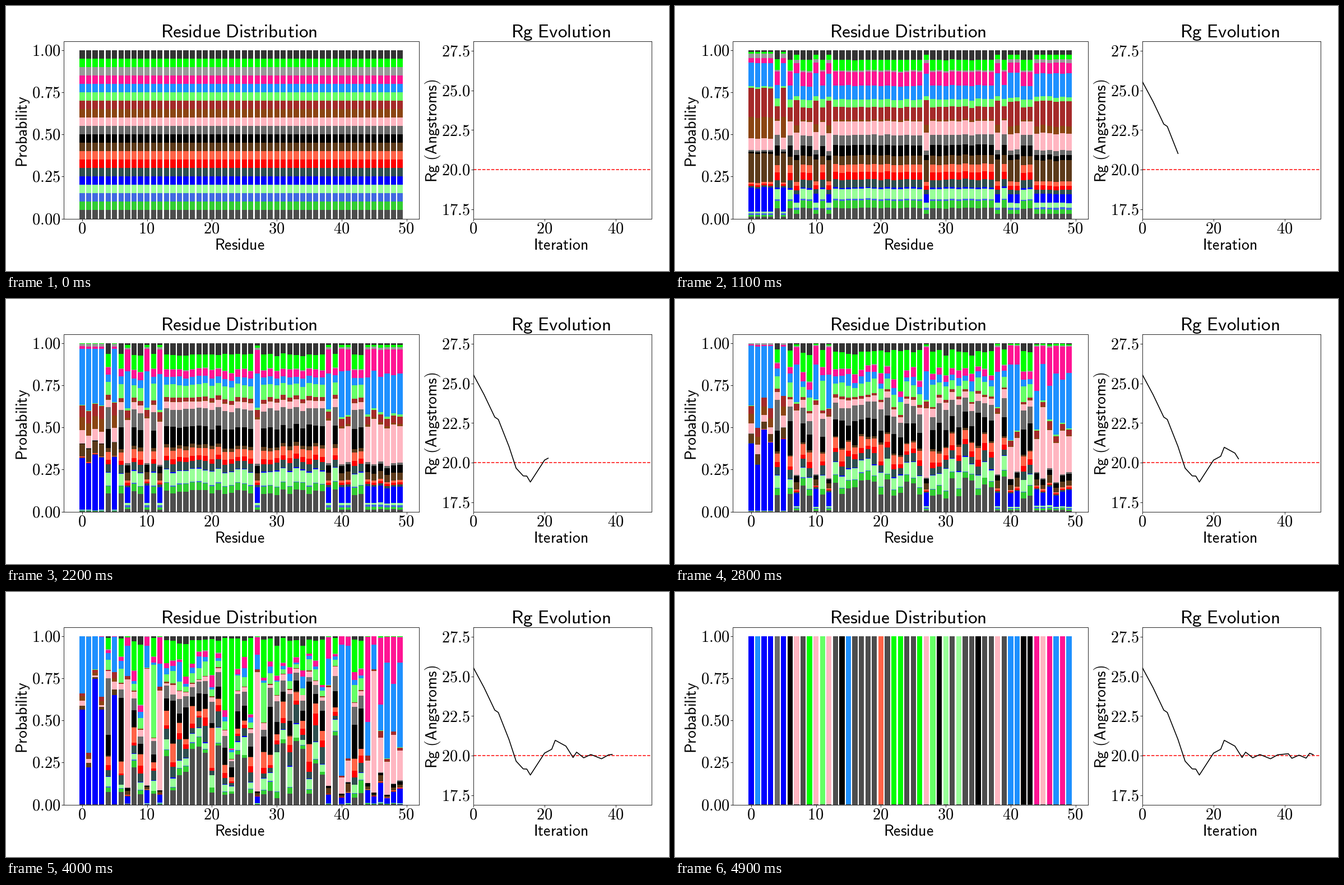
Animation of 1183x473 px, one loop 5 s. Source, as a matplotlib script:

```python
import numpy as np
import matplotlib.pyplot as plt
from matplotlib.animation import FuncAnimation
from matplotlib.collections import PolyCollection

W, H, DPI = 1183, 473, 100
FRAMES, BARS = 50, 50
plt.rcParams["mathtext.fontset"] = "cm"

COLORS = ["#4d4d4d", "#32cd32", "#4169e1", "#98ff98", "#0000ff",
          "#2f4f4f", "#ff0000", "#ff6347", "#5c3a1a", "#000000",
          "#696969", "#ffb6c1", "#8b4513", "#a52a2a", "#66ff66",
          "#1e90ff", "#ff1493", "#999999", "#00ff00", "#333333"]
KINDS = len(COLORS)
(GRAY, GREEN, ROYAL, PALE, BLUE, SLATE, RED, TOMATO, UMBER, BLACK,
 DIM, PINK, SADDLE, BROWN, MINT, DODGER, ROSE, SILVER, LIME, DARK) = range(KINDS)


def normal(p):
    return p / p.sum(axis=-1, keepdims=True)


def blend(a, b, u):
    """Softmax path between two compositions."""
    return normal(a ** (1 - u) * b ** u)


def palette(levels, rest):
    """Composition from {weight: colours}; all others weigh `rest`."""
    p = np.full(KINDS, float(rest))
    for weight, kinds in levels.items():
        p[kinds] = weight
    return normal(p)


# Inner residues, both chain ends, and the charged or sticky ones between.
CORE_EARLY = palette({8.5: [PINK, DODGER, BROWN, ROSE],
                      6: [GRAY, UMBER, BLACK, DIM, PALE, LIME, DARK],
                      4.5: [GREEN, MINT, SLATE, TOMATO, RED]}, 1)
CORE_MID = palette({12: [GRAY, BLACK, DIM], 8.5: [LIME, DARK, MINT, PALE],
                    5: [GREEN, SLATE, TOMATO, PINK, DODGER, ROSE],
                    3: [RED, BROWN, UMBER]}, .5)
CORE_LATE = palette({14: [LIME], 9: [GRAY, BLACK, DIM],
                     6: [MINT, PALE, SLATE, TOMATO],
                     3: [RED, GREEN, ROSE, PINK, DARK, DODGER]}, .3)
END_EARLY = palette({18: [UMBER, BROWN], 13: [SADDLE, BLUE, DODGER],
                     7: [PINK], 3: [ROSE, SILVER]}, 1.2)
END_MID = palette({34: [DODGER], 29: [BLUE],
                   9: [UMBER, BROWN, PINK, SADDLE], 2: [ROSE, SILVER]}, .4)
TAIL_MID = palette({22: [PINK, DODGER], 14: [ROSE], 10: [BLUE],
                    5: [BROWN, UMBER, BLACK]}, 1.6)

ENDS = [0, 1, 2, 3, 5]
TAILS = [7, 10, 12, 27, 38, 40, 41, *range(44, 50)]

# Colour each residue settles on; all others turn GRAY.
WINNERS = {BLUE: [0, 2, 3, 5], DODGER: [1, 15, 40, 41, 47, 49], DIM: [4],
           BLACK: [6, 14, 29, 35, 42, 43], PINK: [7, 10, 12, 27, 38, 45],
           LIME: [9, 22, 23, 26], MINT: [11, 28], TOMATO: [20],
           PALE: [30, 32], ROSE: [44, 46, 48]}


def build_keys():
    rng = np.random.default_rng(7)
    early = np.tile(CORE_EARLY, (BARS, 1))
    mid = np.tile(CORE_MID, (BARS, 1))
    late = np.tile(CORE_LATE, (BARS, 1))
    early[ENDS], mid[ENDS] = END_EARLY, END_MID
    early[TAILS], mid[TAILS] = blend(CORE_EARLY, END_EARLY, .55), TAIL_MID
    outer = ENDS + TAILS
    late[outer] = normal(mid[outer] ** 1.7)

    best = np.full(BARS, GRAY)
    for kind, bars in WINNERS.items():
        best[bars] = kind
    won = np.eye(KINDS)[best]
    late = normal(late * np.exp(rng.normal(0, .45, late.shape) + 1.3 * won))
    return [np.full((BARS, KINDS), 1 / KINDS), blend(early, late, .04),
            blend(mid, late, .12), late, normal(won + 2e-5)]


TIMES = [0, 11, 22, 40, 49]
KEYS = build_keys()


def shares(n):
    k = min(np.searchsorted(TIMES, n, side="right") - 1, len(TIMES) - 2)
    u = (n - TIMES[k]) / (TIMES[k + 1] - TIMES[k])
    return blend(KEYS[k], KEYS[k + 1], u)


# Turning points of the radius: a fall, one overshoot, then a small ripple.
TURNS = [(0, 25.56), (3, 24.3), (6, 22.88), (7, 22.73), (10, 21.02),
         (12, 19.65), (14, 19.16), (15, 19.15), (16, 18.77), (20, 20.16),
         (22, 20.4), (23, 20.97), (26, 20.6), (28, 19.88), (29, 20.22),
         (31, 19.86), (33, 20.07), (36, 19.8), (38, 20.05), (41, 20.12),
         (42, 19.83), (44, 20.03), (46, 19.84), (47, 20.15), (48, 20.06)]
STEPS = np.arange(FRAMES)
RADIUS = np.interp(STEPS, *zip(*TURNS))

fig = plt.figure(figsize=(W / DPI, H / DPI), dpi=DPI, facecolor="white")


def panel(x0, x1, xlim, ylim):
    y0, y1 = 379.5, 63.5
    ax = fig.add_axes([x0 / W, 1 - y0 / H, (x1 - x0) / W, (y0 - y1) / H])
    ax.set(xlim=xlim, ylim=ylim)
    for s in ax.spines.values():
        s.set_linewidth(.6)
    ax.tick_params(width=.6, length=2.6, labelbottom=False, labelleft=False)
    return ax


def put(x, y, s, px, **kw):
    kw = {"ha": "center", "va": "baseline", **kw}
    fig.text(x / W, 1 - y / H, f"${s}$", fontsize=px * 72 / DPI, **kw)


def sans(x, y, s, px, **kw):
    put(x, y, r"\mathsf{%s}" % s.replace(" ", r"\ "), px, **kw)


def ticks(ax, xs, ys, fmt, right):
    ax.set_xticks(xs)
    ax.set_yticks(ys)
    box = ax.get_position()
    (a, b), (c, d) = ax.get_xlim(), ax.get_ylim()
    for v in xs:
        x = (box.x0 + box.width * (v - a) / (b - a)) * W
        put(x - .5, 405.5, v, 28.5)
    for v in ys:
        y = (1 - box.y0 - box.height * (v - c) / (d - c)) * H
        put(right, y + 9.5, fmt % v, 28.5, ha="right")


left = panel(102.5, 736.5, (-2.89, 51.89), (0, 1.05))
right = panel(834, 1151.5, (0, 50), (16.9, 28.1))
ticks(left, range(0, 51, 10), [0, .25, .5, .75, 1], "%.2f", 97.5)
ticks(right, [0, 20, 40], [17.5, 20, 22.5, 25, 27.5], "%.1f", 828.5)

sans(415.7, 56, "Residue Distribution", 33.3)
sans(989.5, 56, "Rg Evolution", 33.3)
sans(417, 435, "Residue", 27.8)
sans(990, 435, "Iteration", 27.8)
turned = dict(rotation=90, rotation_mode="anchor")
sans(38, 224, "Probability", 27.8, **turned)
sans(769, 223, "Rg (Angstroms)", 27.8, **turned)

stacks = [left.add_collection(PolyCollection([], facecolors=c, linewidths=0, snap=True),
                              autolim=False) for c in COLORS]
right.axhline(20, color="red", ls="--", lw=1.08)
line, = right.plot([], [], color="black", lw=1.15)

X0 = np.arange(BARS) - .4
X1 = X0 + .8


def draw(n):
    tops = np.cumsum(shares(n), axis=1)
    low = np.zeros(BARS)
    for stack, high in zip(stacks, tops.T):
        quads = [(X0, low), (X0, high), (X1, high), (X1, low)]
        stack.set_verts(np.array(quads).transpose(2, 0, 1))
        low = high
    line.set_data(STEPS[:n], RADIUS[:n])
    return [*stacks, line]


anim = FuncAnimation(fig, draw, frames=FRAMES, interval=100, repeat=True,
                     repeat_delay=0, blit=False)
plt.show()
```
